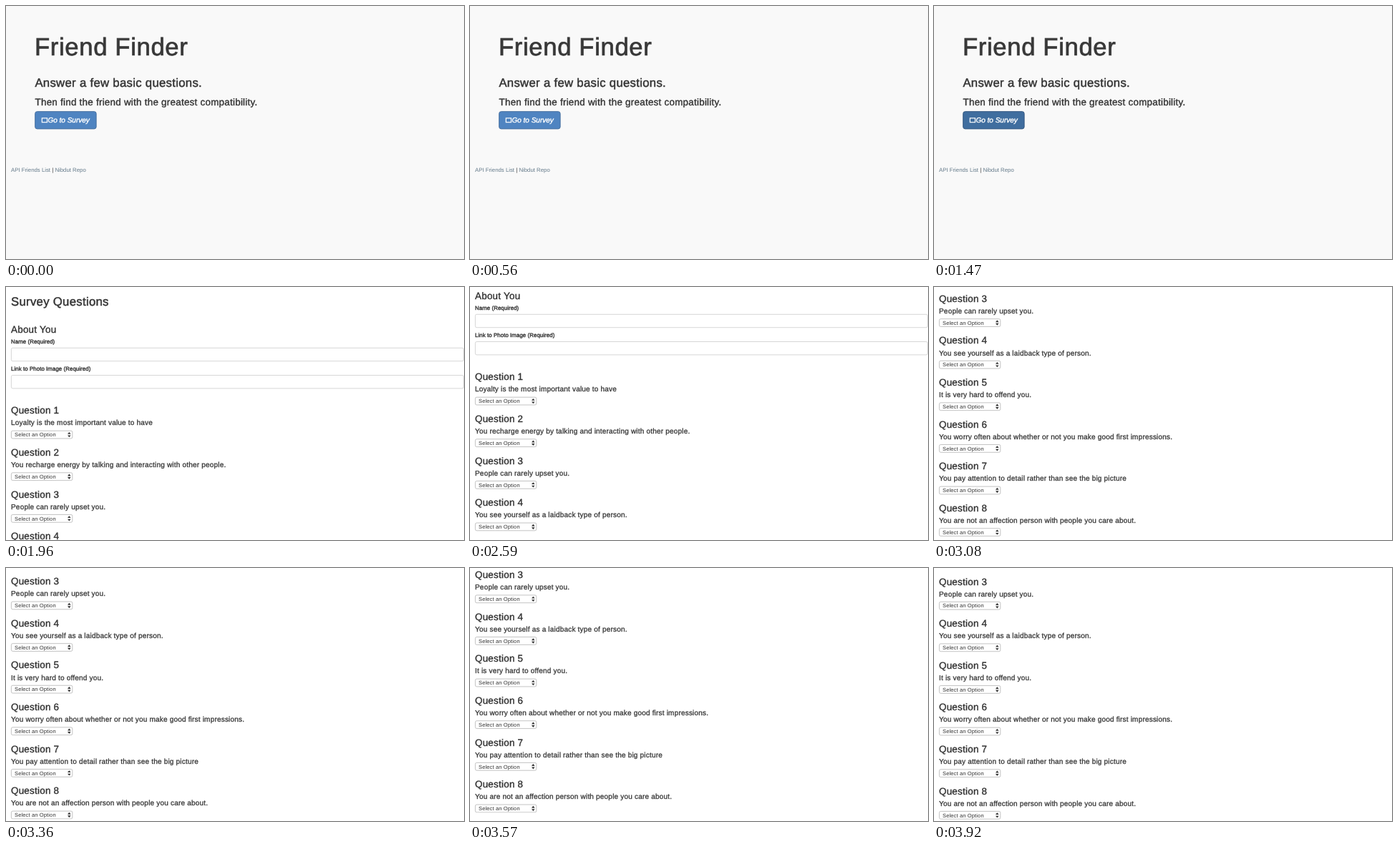
An HTML page for the animation above (3.99 s loop, 640 px wide and 354 px high).

```html
<!DOCTYPE html>
<html lang="en">
<head>
<meta charset="utf-8">
<title>Friend Finder</title>
<style>
  html, body { margin: 0; width: 100%; height: 100%; overflow: hidden; background: #fff; }
  svg { display: block; width: 640px; height: 354px; }
  text {
    font-family: "Liberation Sans", Arial, sans-serif;
    text-rendering: geometricPrecision;
    fill: #333;
    stroke: #333;
    stroke-width: .028em;
    letter-spacing: .019em;
  }
  .h1 { font-size: 34.7px; letter-spacing: .018em; stroke-width: .02em; fill: #383838; stroke: #383838; }
  .h2 { font-size: 16.7px; }
  .h3 { font-size: 13.4px; }
  .h4 { font-size: 10.03px; }
  .label { font-size: 7.8px; letter-spacing: .013em; stroke-width: .05em; }
  .pick { font-size: 7.5px; stroke-width: 0; }
  .links { font-size: 7.8px; letter-spacing: 0; stroke-width: 0; }
  .links tspan { fill: #647a8a; }
  .go { font-size: 10.03px; font-style: italic; letter-spacing: 0; stroke-width: .04em; fill: #fff; stroke: #fff; }
  .button { fill: #4f84c1; stroke: #456f9f; animation: hover 3990ms step-end infinite; }
  .icon { fill: none; stroke: #fff; stroke-width: 1.2; }
  .input { fill: #fff; stroke: #ccc; stroke-width: .8; }
  .select { fill: #fff; stroke: #b4b4b4; stroke-width: .8; }
  .arrows { fill: #333; }

  #survey { animation: open 3990ms step-end infinite; }
  #page { animation: scroll 3990ms step-end infinite; }

  @keyframes hover {
    0% { fill: #4f84c1; stroke: #456f9f; }
    33.333%, 100% { fill: #406e9f; stroke: #345880; }
  }
  @keyframes open {
    0% { visibility: hidden; }
    40.351%, 100% { visibility: visible; }
  }
  @keyframes scroll {
    0% { transform: translateY(0); }
    64.912% { transform: translateY(-47px); }
    68.421% { transform: translateY(-93.6px); }
    73.684% { transform: translateY(-145px); }
    75.439% { transform: translateY(-228px); }
    77.193% { transform: translateY(-273.8px); }
    78.947% { transform: translateY(-274.3px); }
    84.211% { transform: translateY(-271.4px); }
    87.719% { transform: translateY(-276px); }
    89.474% { transform: translateY(-280.5px); }
    96.491% { transform: translateY(-275px); }
    98.246%, 100% { transform: translateY(-271.1px); }
  }
</style>
</head>
<body>
<svg viewBox="0 0 640 354">
  <g id="home">
    <rect width="640" height="354" fill="#f9f9f9"/>
    <text class="h1" x="40" y="69">Friend Finder</text>
    <text class="h2" x="40.4" y="112.7">Answer a few basic questions.</text>
    <text class="h3" x="40.5" y="139.1">Then find the friend with the greatest compatibility.</text>
    <rect class="button" x="40.7" y="147.7" width="85.4" height="24.2" rx="2.8"/>
    <rect class="icon" x="50.3" y="156.9" width="7.2" height="5.8"/>
    <text class="go" x="58.4" y="163.2">Go to Survey</text>
    <text class="links" x="7" y="232.2"><tspan>API Friends List</tspan> | <tspan>Nibdut Repo</tspan></text>
  </g>
  <g id="survey">
    <rect width="640" height="354" fill="#fff"/>
    <g id="page">
      <text class="h2" x="7" y="25.7">Survey Questions</text>
      <text class="h3" x="7" y="64">About You</text>
      <text class="label" x="7" y="78.8">Name (Required)</text>
      <rect class="input" x="7.4" y="85.3" width="632" height="18.4" rx="2"/>
      <text class="label" x="7" y="117">Link to Photo Image (Required)</text>
      <rect class="input" x="7.4" y="123.5" width="632" height="18.4" rx="2"/>
    </g>
  </g>
</svg>
<script>
  const questions = [
    'Loyalty is the most important value to have',
    'You recharge energy by talking and interacting with other people.',
    'People can rarely upset you.',
    'You see yourself as a laidback type of person.',
    'It is very hard to offend you.',
    'You worry often about whether or not you make good first impressions.',
    'You pay attention to detail rather than see the big picture',
    'You are not an affection person with people you care about.'
  ];
  const rowHeight = 58.62;

  const row = (question, i) => `
    <g transform="translate(0 ${172.6 + i * rowHeight})">
      <text class="h3" x="7" y="4.8">Question ${i + 1}</text>
      <text class="h4" x="7" y="20.9">${question}</text>
      <rect class="select" x="7.4" y="28.6" width="85.4" height="10.8" rx="2"/>
      <text class="pick" x="12" y="36.7">Select an Option</text>
      <path class="arrows" d="M86 33.2l2.3-2.9 2.3 2.9zM86 34.8l2.3 2.9 2.3-2.9z"/>
    </g>`;

  document.getElementById('page').insertAdjacentHTML('beforeend', questions.map(row).join(''));
</script>
</body>
</html>
```
